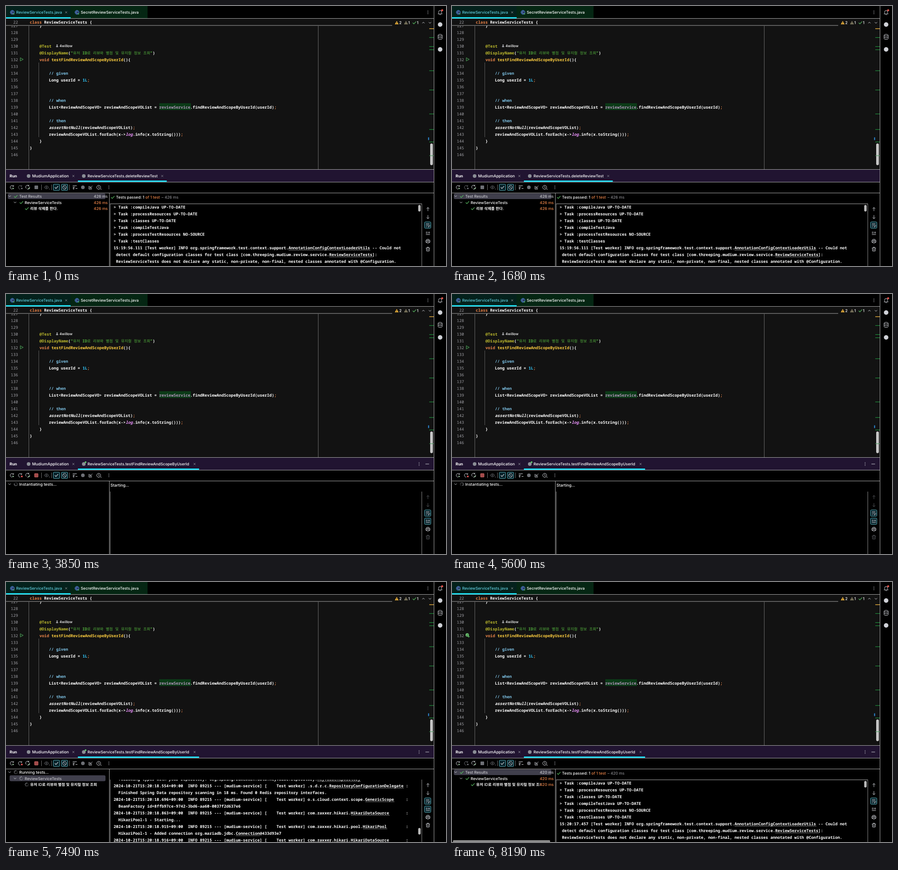
These frames come from a looping animation (973 by 575 pixels, 9310 ms). An HTML page:

```html
<!DOCTYPE html>
<html lang="ko">
<head>
<meta charset="utf-8">
<title>Test run</title>
<style>
html, body { margin: 0; width: 100%; height: 100%; overflow: hidden; background: #000; }
svg { display: block; width: 973px; height: 575px; }
text { font: 500 8.6px Inter, 'Noto Sans CJK KR', sans-serif; fill: #fff; text-rendering: geometricPrecision; }
.mono { font: 600 8.842px 'Noto Sans Mono', 'Noto Sans CJK KR', monospace; }
.ko { font-size: 8.35px; }
text:not(.mono) .ko { font-weight: 700; }
.mono .ko { font-weight: 500; }
.o { fill: #ed864a; } .y { fill: #ffcf40; } .a { fill: #bbb82d; } .g { fill: #54b33e; }
.c { fill: #7ec3e6; } .n { fill: #33ccff; } .f { fill: #b294bb; }
.p { fill: #ed94ff; font-style: italic; } .i { font-style: italic; }
.dim { fill: #a0a0a6; font-weight: 400; } .end { text-anchor: end; }
</style>
</head>
<body>
<svg id="stage" viewBox="0 0 973 575"></svg>
<script>
const LOOP = 9310, TICK = 70, CW = 5.305;
const START = 1750, HOVER = 2380, RUN = 6790, LOGS = 7280, DONE = 7770, FILLED = 7980;
const FG = '#ced0d6', GREEN = '#57b85f', CYAN = '#1aebff', EDGE = '#a8a8a8', DIM = '#55575c', OFF = '#6e7076';

// Inline markup: «class:text»
const MARK = /«\w:|»/g;
const format = s => s.replace(/&/g, '&amp;').replace(/</g, '&lt;').replace(/ /g, '\u00a0')
  .replace(/«(\w):([^»]*)»/g, '<tspan class="$1">$2</tspan>')
  .replace(/[가-힣]+/g, '<tspan class="ko">$&</tspan>');
const text = (x, y, s, cls = '', attrs = '') =>
  `<text x="${x}" y="${y}" class="${cls}" ${attrs}>${format(s)}</text>`;
const rect = (x, y, w, h, fill, attrs = '') =>
  `<rect x="${x}" y="${y}" width="${w}" height="${h}" fill="${fill}" ${attrs}/>`;
const path = (d, color = FG, w = 1, attrs = '') =>
  `<path d="${d}" fill="none" stroke="${color}" stroke-width="${w}" ${attrs}/>`;
const dot = (x, y, r, fill) => `<circle cx="${x}" cy="${y}" r="${r}" fill="${fill}"/>`;
const ring = (x, y, r, color = FG) => `<circle cx="${x}" cy="${y}" r="${r}" fill="none" stroke="${color}"/>`;

function code(x, y, s) {
  let out = text(x, y, s, 'mono');
  for (const m of s.matchAll(/«u:([^»]*)»/g)) {
    const from = x + s.slice(0, m.index).replace(MARK, '').length * CW;
    out += path(`M${from} ${y + 2}h${m[1].length * CW}`, '#d0d0d0', 1, 'stroke-dasharray="1.6 1"');
  }
  return out;
}

const down = (x, y, c) => path(`M${x - 2.6} ${y - 1.3}l2.6 2.6 2.6-2.6`, c);
const up = (x, y, c) => path(`M${x - 2.6} ${y + 1.3}l2.6-2.6 2.6 2.6`, c);
const cross = (x, y) => path(`M${x - 2.2} ${y - 2.2}l4.4 4.4m0-4.4l-4.4 4.4`, '#9a9ca3', .8);
const check = (x, y, c = GREEN) => path(`M${x - 3.6} ${y}l2.6 2.6 4.8-5.2`, c, 1.3);
const more = (x, y) => [-3, 0, 3].map(d => dot(x, y + d, .8, FG)).join('');
const play = (x, y, r, c = GREEN, fill = c) =>
  `<path d="M${x - r * .8} ${y - r}L${x + r} ${y}L${x - r * .8} ${y + r}Z" fill="${fill}" stroke="${c}"/>`;
const badge = (x, y) => play(x, y, 1.3, '#9cc8a2');
const frame = (x, y) => rect(x - 7, y - 7, 14, 14, '#08222a', 'rx="2" stroke="#62bfca" stroke-width=".9"');
const triangle = (x, c) => `<path d="M${x} 33l4.2 7.4h-8.4Z" fill="${c}"/>` + path(`M${x} 35.6v2.3m0 .8v1`, '#111');
const rerun = (x, y, c) => path(`M${x + 3} ${y - 2.4}A4 4 0 1 0 ${x} ${y + 4}M${x + 3.4} ${y - 4.6}v2.6h-2.6`, c);
const classIcon = x => `<circle cx="${x}" cy="14" r="4.3" fill="#1b2d52" stroke="#5b95f5"/>`
  + path(`M${x + 1.7} 12.5a2.2 2.2 0 1 0 0 3`, '#8cb5ff') + play(x + 3.6, 17.4, 1.1);
const spinner = (x, y) => `<g transform="translate(${x} ${y})" stroke="#c4c6cc" stroke-width="1.1">`
  + Array.from({length: 8}, (_, i) => `<path class="spoke${i}" d="M0-2.2V-4.6" transform="rotate(${i * 45})"/>`).join('') + '</g>';

const layers = [];
function layer(spans, body) {
  layers.push(spans);
  return `<g class="layer">${body}</g>`;
}
const idle = [[0, START], [DONE, LOOP]];

function editor() {
  const lines = {
    127: [74, '}'],
    130: [74, '«a:@Test»'],
    131: [74, '«a:@DisplayName»(«g:"유저 ID로 리뷰와 별점 및 뮤지컬 정보 조회"»)'],
    132: [74, '«o:void» «y:testFindReviewAndScopeByUserId»(){'],
    134: [95, '«c:// given»'],
    135: [95, 'Long userId = «n:1L»«o:;»'],
    138: [95, '«c:// when»'],
    139: [95, 'List<ReviewAndScopeVO> reviewAndScopeVOList = «f:reviewService».findReviewAndScopeByUserId(userId)«o:;»'],
    141: [95, '«c:// then»'],
    142: [95, '«i:assertNotNull»(reviewAndScopeVOList)«o:;»'],
    143: [95, 'reviewAndScopeVOList.forEach(x->«p:log».info(x.toString()))«o:;»'],
    144: [74, '}'],
    145: [52.5, '}']
  };
  let out = rect(0, 28, 946, 333, '#121212')
    + path('M50.5 44V361M690.5 44V361', '#6a6a6a') + path('M72.5 125V290', '#5a5a5a')
    + rect(339, 215, 70, 15, '#0b3a17');
  let body = '';
  for (let n = 127; n <= 146; n++) {
    const y = 61.5 + 15 * (n - 128);
    body += text(26.5, y, String(n), 'mono dim end');
    if (lines[n]) body += code(lines[n][0], y, lines[n][1]);
  }
  out += `<g clip-path="url(#code)">${body}</g>`;
  out += dot(113, 86.6, 1.3, FG) + rect(110.6, 88.8, 4.8, 2, FG, 'rx="1"')
    + text(118.2, 91.4, '4willow', '', 'style="font-size:7.9px"');
  // sticky class line and inspections
  out += text(26.5, 39, '22', 'mono dim end') + code(52.5, 39, '«o:class» ReviewServiceTests {')
    + path('M0 27.5H946M0 43H854', EDGE)
    + triangle(864, '#f2b63c') + text(869.5, 40, '2') + triangle(884.5, '#8a8468') + text(889.5, 40, '1')
    + check(903, 37) + text(908.5, 40, '1') + up(923, 37) + down(937.5, 37);
  // stripe marks and scroll thumb
  out += rect(936, 49.5, 10, 1.5, '#e0a93a')
    + [69, 89, 96, 142.5, 185, 238, 272.5, 300].map(y => rect(936, y, 10, 1.3, '#1f8a3a')).join('')
    + rect(933.5, 290.5, 2, 6, '#2f8fe0') + rect(938, 304, 6, 48, '#c6c6c6', 'rx="3"')
    + rect(936, 330.5, 10, 1, '#3f9a55');
  return out;
}

function chrome() {
  return rect(0, 0, 143, 27, '#04211c') + rect(143, 0, 170, 27, '#052613') + rect(0, 24.8, 143, 2.7, CYAN)
    + classIcon(14) + text(22.5, 17, 'ReviewServiceTests.java', '', 'style="fill:#62cfe0"') + cross(133, 14)
    + classIcon(157) + text(165.3, 17, 'SecretReviewServiceTests.java') + more(933, 14)
    + path('M946.5 0V575', EDGE)
    // side bar
    + path('M955.5 17.5h9c-1.5-1.5-1.3-3-1.3-4.5a3.2 3.2 0 0 0-6.4 0c0 1.5 .2 3-1.3 4.5M958.7 19.3h2.6') + dot(964.5, 9.5, 2.3, '#e5534b')
    + dot(960, 41, 5, FG)
    + path('M955.5 64.5a4.5 1.9 0 0 1 9 0v7.5a4.5 1.9 0 0 1-9 0v-7.5a4.5 1.9 0 0 0 9 0M955.5 68.2a4.5 1.9 0 0 0 9 0')
    + dot(960, 96, 5, FG);
}

function toolbar() {
  const y = 401;
  return rect(0, 362, 946, 27, '#211431') + path('M0 361.5H946M0 389.5H946M0 413.5H946', EDGE)
    + text(8, 379, 'Run', '', 'style="font-weight:700"')
    + dot(50, 376, 4, '#8b8e96') + text(57.8, 379, 'MudiumApplication', '', 'style="font-size:8.75px"') + cross(149, 376)
    + dot(172, 376, 4, '#8b8e96')
    + rerun(13.5, y, FG) + badge(16, y + 2.5)
    + layer(idle, rerun(31.5, y, OFF) + dot(35, y + 2.5, 1.8, OFF) + rect(63, y - 4, 8, 8, OFF, 'rx="1"'))
    + layer([[START, DONE]], rerun(31.5, y, FG) + dot(35, y + 2.5, 2, '#e05555')
      + rect(63, y - 4, 8, 8, '#a34a4a', 'rx="1" stroke="#d06a66" stroke-width=".8"'))
    + path(`M45 ${y + 2.5}a4 4 0 0 1 5-6.3m2 2.3a4 4 0 0 1-5 5.5M50.5 ${y - 5.5}v2.6h-2.6`) + badge(51, y + 2.5)
    + path('M78.5 395V407M100.5 395V407M140.5 395V407', '#707070')
    + path(`M84.5 ${y}q5-7 10 0q-5 7-10 0Z`, OFF) + ring(89.5, y, 1.5, OFF) + rect(95, y + 3, 1.5, 1.5, OFF)
    + frame(111.5, y) + check(111.5, y, FG) + frame(129.5, y) + ring(129.5, y, 4.2) + path(`M126.5 ${y - 3}l6 6`)
    + path(`M147.5 ${y - 3.5}h9M147.5 ${y - .5}h5M149.5 ${y - .5}v4.5M147.5 ${y + 2.3}l2 2 2-2M154 ${y + 2.5}h4`)
    + dot(170, y, 4, OFF)
    + path(`M191 ${y - 3.5}l-5 5m0-4v4h4M183.5 ${y - 3}v7h6.5`)
    + ring(205, y, 4.3) + path(`M205 ${y - 2.5}v2.7l2 1.3`) + rect(209.5, y + 3.5, 1.5, 1.5, FG) + more(227.5, y);
}

function tabs() {
  const tab = (name, end) => rect(159, 386, end - 159, 2.7, CYAN)
    + text(180.3, 379, 'ReviewServiceTests.' + name, '', 'style="font-size:8.5px"') + cross(end - 10, 376);
  return layer([[0, START]], tab('deleteReviewTest', 355.5))
    + layer([[START, LOOP]], tab('testFindReviewAndScopeByUserId', 427))
    + layer([[HOVER, DONE]], dot(176, 372, 1.9, '#5fce6a'))
    + layer([[HOVER, LOOP]], more(913.5, 376) + path('M927.5 376h8'));
}

const pale = 'style="fill:#c6c6cc"', status = 'style="font-size:8.8px"';

function results(label, ms) {
  const time = `${ms} ms`;
  return rect(4, 414.5, 216, 12.5, '#403f4c', 'rx="3"')
    + down(8, 420.5) + check(21.5, 421) + text(29.2, 424, 'Test Results', '', pale) + text(225, 424, time, 'end', pale)
    + down(20, 434.3) + check(34, 434.5) + text(41.2, 437.6, 'ReviewServiceTests') + text(225, 437.6, time, 'o end')
    + check(46, 448) + text(53.6, 451.2, label, '', 'clip-path="url(#name)"') + text(225, 451.2, time, 'o end')
    + check(236, 423) + text(243.2, 426, 'Tests passed: 1«o: of 1 test»')
    + text(344, 426, `– ${time}`, 'dim');
}

function tree() {
  const label = '유저 ID로 리뷰와 별점 및 뮤지컬 정보 조회';
  return layer([[0, START]], results('리뷰 삭제를 한다.', 426))
    + layer([[DONE, LOOP]], results(label, 420) + rect(2, 571, 215, 5, '#8c8c8c', 'rx="2"'))
    + layer([[START, RUN]], down(8, 420.5) + spinner(21.8, 420.5)
      + text(29.2, 424, 'Instantiating tests...', '', status) + text(231, 426, 'Starting...', '', status))
    + layer([[RUN, DONE]], rect(8, 427.5, 212, 13, '#403f4c', 'rx="3"')
      + down(8, 420.5) + spinner(21.8, 420.5) + text(29.2, 424, 'Running tests...', '', status)
      + down(20, 434.3) + spinner(33.8, 434.3) + text(41.2, 437.6, 'ReviewServiceTests', '', pale)
      + spinner(46, 448) + text(53.6, 451.2, label));
}

function consoleLines(y, lines) {
  return `<g clip-path="url(#log)">${lines.map((s, i) => code(238, y + 15 * i, s)).join('')}</g>`;
}
const thumb = y => rect(911.5, y, 5.5, 14.5, '#b8b8b8', 'rx="2.7"');

function gradleLog(stamp, state) {
  const tasks = ['compileJava UP-TO-DATE', 'processResources UP-TO-DATE', 'classes UP-TO-DATE',
    'compileTestJava' + state, 'processTestResources NO-SOURCE', 'testClasses' + state];
  return consoleLines(448, [...tasks.map(s => '> Task :' + s),
    `${stamp} [Test worker] INFO org.springframework.test.context.support.«u:AnnotationConfigContextLoaderUtils» -- Could not`,
    ' detect default configuration classes for test class [com.threeping.mudium.review.service.«u:ReviewServiceTests»]:',
    ' ReviewServiceTests does not declare any static, non-private, non-final, nested classes annotated with @Configuration.'
  ]) + thumb(440);
}

function springLog() {
  const entry = (ms, pkg, cls) => `2024-10-21T15:20:18.${ms}+09:00  INFO 89215 --- [mudium-service] [    Test worker] `
    + `${pkg}.«u:${cls}»` + ' '.repeat(40 - pkg.length - cls.length) + ':';
  const hikari = 'com.zaxxer.hikari';
  return consoleLines(439, [
    '  following types with your repository: org.springframework.data.keyvalue.repository.«u:KeyValueRepository»',
    entry(554, '.s.d.r.c', 'RepositoryConfigurationDelegate'),
    '  Finished Spring Data repository scanning in 18 ms. Found 0 Redis repository interfaces.',
    entry(696, 'o.s.cloud.context.scope', 'GenericScope'),
    '  BeanFactory id=8ffb97ce-9742-3bd6-aa60-0037f2d637e6',
    entry(863, hikari, 'HikariDataSource'),
    '  HikariPool-1 - Starting...',
    entry(915, hikari + '.pool', 'HikariPool'),
    '  HikariPool-1 - Added connection org.mariadb.jdbc.«u:Connection»@433d93e7',
    entry(916, hikari, 'HikariDataSource')
  ]) + thumb(544);
}

function consolePane() {
  const tools = c => path('M933 453.5v-8m-3 3l3-3 3 3M933 462.5v8m-3-3l3 3 3-3', c)
    + path('M928.5 535.2h9M931.5 535v-1.7h3v1.7M929.5 535.5l.6 6.5h5.8l.6-6.5M931.8 537.5v2.7M934.2 537.5v2.7', c);
  return path('M228.5 414V575', EDGE) + path('M230.5 437V575M919.5 437V575', '#8c8c8c')
    + layer(idle, path('M230 437.5H919.5', EDGE))
    + layer([[0, START]], gradleLog('15:19:56.111', ''))
    + layer([[RUN + TICK, LOGS], [FILLED, LOOP]], gradleLog('15:20:17.457', ' UP-TO-DATE'))
    + layer([[LOGS, DONE]], springLog())
    + layer([[0, START], [RUN + TICK, LOOP]], tools(FG))
    + layer([[START, RUN + TICK]], tools(DIM))
    + frame(932.5, 484.5) + path('M928.5 481.5h8M928.5 484.5h7a1.7 1.7 0 0 1 0 3.5h-2.5m1.5-1.5l-1.5 1.5 1.5 1.5M928.5 488h2.5')
    + layer([[START, FILLED]], frame(932.5, 502.5))
    + path('M928.5 500h4M928.5 502.5h4M928.5 505.5h9M935.5 498.5v4.5m-1.8-1.8l1.8 1.8 1.8-1.8')
    + path('M930.5 518.5v-2.5h5v2.5M930.5 522.5h-2v-4h9v4h-2M930.5 520.8h5v3.2h-5Z');
}

const stage = document.getElementById('stage');
stage.innerHTML = `<defs>
  <clipPath id="code"><path d="M0 44H936V361H0Z"/></clipPath>
  <clipPath id="log"><path d="M231 437.8H911V575H231Z"/></clipPath>
  <clipPath id="name"><path d="M50 440H195.5V456H50Z"/></clipPath>
</defs>` + editor() + chrome()
  + layer([[0, DONE]], play(34.5, 118, 3.7, '#4f9d58', '#15291a'))
  + layer([[DONE, LOOP]], dot(33.7, 117, 3.8, '#6cc070') + path('M31.8 117l1.5 1.5 2.5-3', '#143a18') + play(37.3, 120.8, 1.5))
  + layer([[770, 840]], down(46, 89, '#777') + down(46, 119, '#777'))
  + toolbar() + tabs() + tree() + consolePane();

const nodes = [...stage.querySelectorAll('.layer')];
const spokes = Array.from({length: 8}, (_, i) => [...stage.querySelectorAll('.spoke' + i)]);
const t0 = performance.now();

function draw(now) {
  const t = Math.floor(Math.max(0, now - t0) % LOOP / TICK) * TICK;
  nodes.forEach((g, i) => {
    g.style.display = layers[i].some(([a, b]) => t >= a && t < b) ? '' : 'none';
  });
  const head = Math.floor((t - 3430) / 135.625) + 3;
  spokes.forEach((list, i) => {
    const age = ((head - i) % 8 + 8) % 8;
    list.forEach(s => s.setAttribute('opacity', 1 - age * .11));
  });
  requestAnimationFrame(draw);
}
draw(t0);
</script>
</body>
</html>
```
